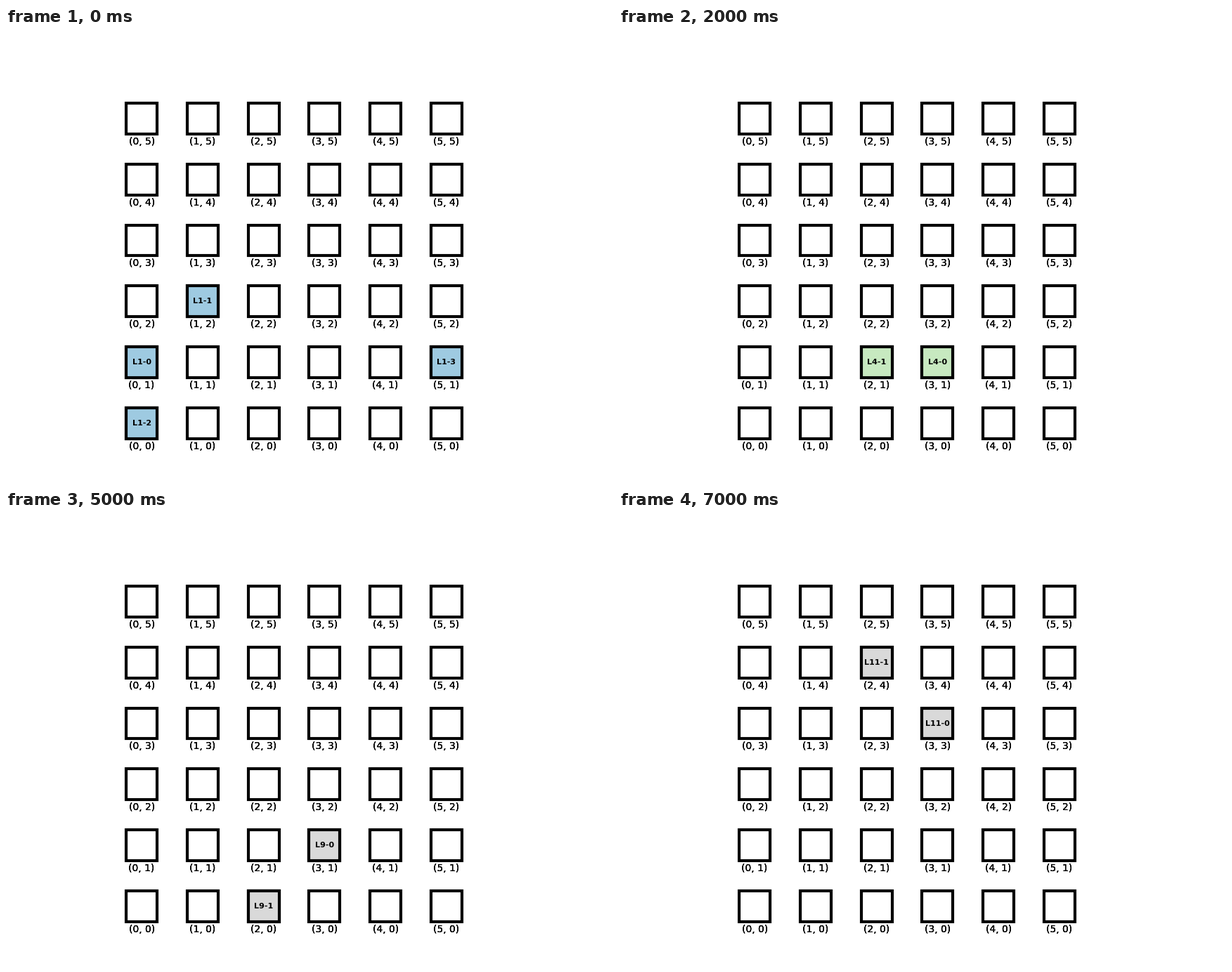
A matplotlib script that plays this animation: 864 px wide and 648 px high, repeating every 8000 ms.

```python
import math

import matplotlib.pyplot as plt
from matplotlib.animation import FuncAnimation
from matplotlib.patches import Rectangle

W, H, DPI = 864, 648, 100
PX = DPI / 72                      # pixels per point
X0, Y0, STEP = 193.1, 562.75, 86.75
SIDE = math.sqrt(1000) * PX        # marker area of 1000 square points
LABEL_DROP = 0.38 * STEP
LABEL_COATS = 3                    # stacked copies give the labels their weight

# (layer, colour, grid cells in part order)
LAYERS = [
    (1, "#9ecae1", [(0, 1), (1, 2), (0, 0), (5, 1)]),
    (3, "#31a354", [(3, 1), (3, 0), (5, 2), (2, 2)]),
    (4, "#c7e9c0", [(3, 1), (2, 1)]),
    (6, "#636363", [(3, 0), (2, 0)]),
    (7, "#d9d9d9", [(2, 1), (3, 0)]),
    (9, "#d9d9d9", [(3, 1), (2, 0)]),
    (10, "#d9d9d9", [(2, 2), (3, 4)]),
    (11, "#d9d9d9", [(3, 3), (2, 4)]),
]

plt.rcParams["font.family"] = "DejaVu Sans"
fig = plt.figure(figsize=(W / DPI, H / DPI), dpi=DPI, facecolor="white")
ax = fig.add_axes([0, 0, 1, 1])
ax.set_xlim(0, W)
ax.set_ylim(H, 0)
ax.axis("off")


def center(col, row):
    return X0 + col * STEP, Y0 - row * STEP


def add_square(col, row, color, z):
    x, y = center(col, row)
    return ax.add_patch(Rectangle((x - SIDE / 2, y - SIDE / 2), SIDE, SIDE,
                                  facecolor=color, edgecolor="black",
                                  linewidth=3, zorder=z))


def add_text(x, y, text, **style):
    return ax.text(x, y, text, ha="center", va="center", color="black",
                   zorder=3, **style)


for col in range(6):
    for row in range(6):
        x, y = center(col, row)
        add_square(col, row, "white", 1)
        for _ in range(LABEL_COATS):
            add_text(x, y + LABEL_DROP, f"({col}, {row})", fontsize=10)

groups = []
for layer, color, cells in LAYERS:
    group = []
    for part, cell in enumerate(cells):
        group.append(add_square(*cell, color, 2))
        group.append(add_text(*center(*cell), f"L{layer}-{part}",
                              fontsize=8, fontweight="bold"))
    groups.append(group)


def show(step):
    for i, group in enumerate(groups):
        for artist in group:
            artist.set_visible(i == step)
    return [artist for group in groups for artist in group]


anim = FuncAnimation(fig, show, frames=len(LAYERS), interval=1000,
                     init_func=lambda: show(0), repeat=True, repeat_delay=0,
                     blit=False)
plt.show()
```
